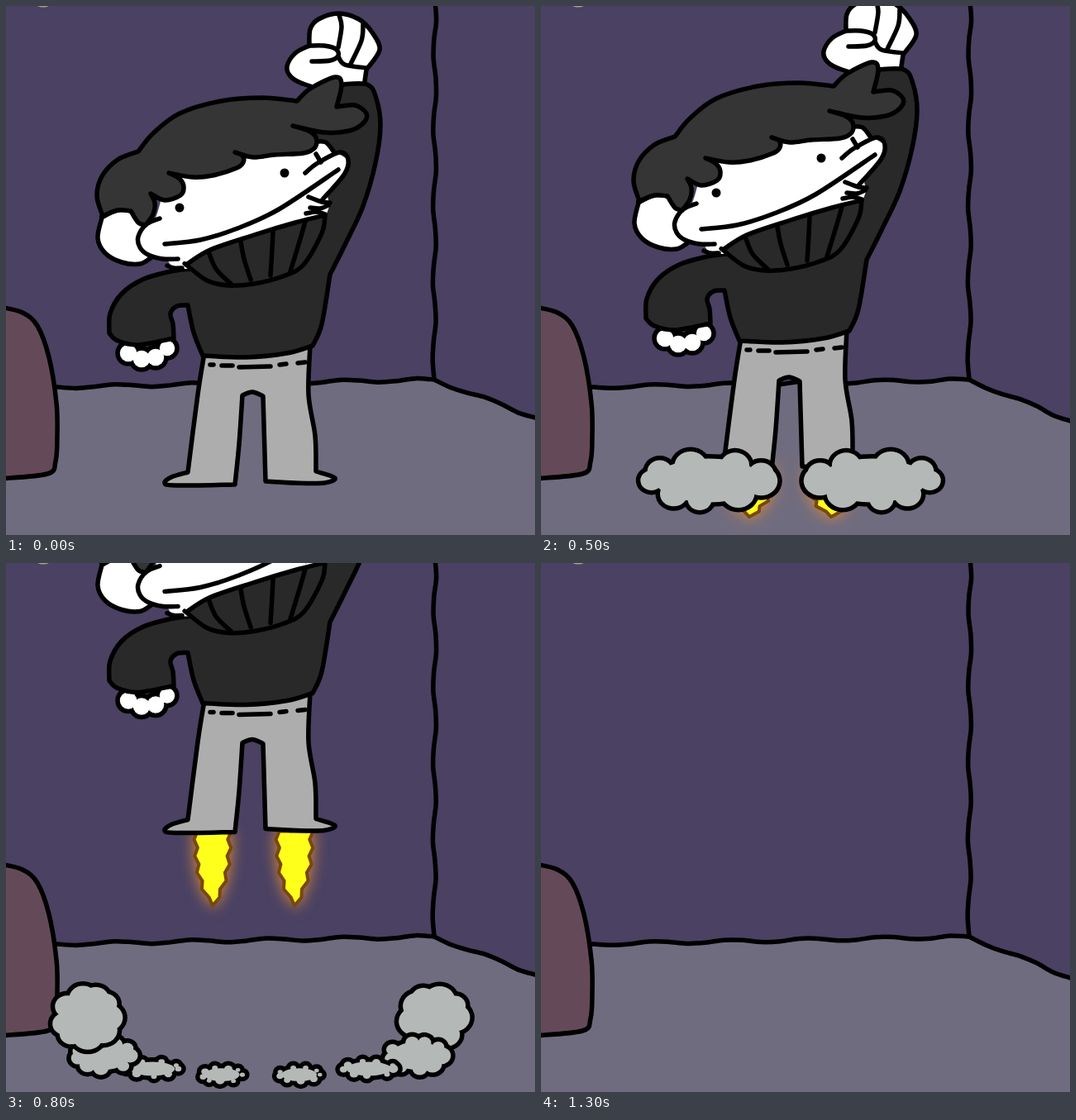
An HTML page that plays this animation: 640x640 px, repeating every 1.4 s.

```html
<!DOCTYPE html>
<html lang="en">
<head>
<meta charset="utf-8">
<title>Rocket shoes</title>
<style>
  html, body { margin: 0; width: 100%; height: 100%; overflow: hidden; background: #4a4163; }
  svg { display: block; width: 100vw; height: 100vh; }
  path { stroke: #000; stroke-width: 5.5; stroke-linecap: round; stroke-linejoin: round; }
  .plain { stroke: none; }
  .flame { stroke: #7a4708; stroke-width: 4; filter: drop-shadow(0 0 9px #d98a3c); }
  .soft { filter: blur(9px); }
</style>
</head>
<body>
<svg id="stage" viewBox="0 0 640 640" preserveAspectRatio="none"></svg>
<script>
const STEP = 100, COUNT = 14, INK = 5.5;
const SKIN = '#fff', HAIR = '#353535', KNIT = '#292929', CLOTH = '#adadad';
const SMOKE = '#b4b8b6', SPARK = '#b99124', FIRE = '#ffff1c';
const { PI, sin, cos, abs, hypot } = Math;
const stage = document.getElementById('stage');

function add(parent, tag, attrs = {}) {
  const node = document.createElementNS('http://www.w3.org/2000/svg', tag);
  for (const key in attrs) node.setAttribute(key, attrs[key]);
  return parent.appendChild(node);
}

const group = (parent, attrs) => add(parent, 'g', attrs);
const range = n => [...Array(n).keys()];

function random(seed) {
  return () => {
    seed = (seed * 16807) % 2147483647;
    return seed / 2147483647;
  };
}

const pairs = text => {
  const n = text.trim().split(/\s+/).map(Number);
  return range(n.length / 2).map(i => [n[2 * i], n[2 * i + 1]]);
};

// Smooth curve through points; "/" marks a corner at the point before it.
function curve(text, closed) {
  const parts = text.split('/').map(pairs);
  const first = parts[0][0];
  if (closed) parts[parts.length - 1].push(first);
  let d = 'M' + first, last = null;
  for (const part of parts) {
    const p = last ? [last, ...part] : part;
    for (let i = 0; i < p.length - 1; i++) {
      const b = p[i], c = p[i + 1], a = p[i - 1] || b, e = p[i + 2] || c;
      const c1 = [0, 1].map(k => b[k] + (c[k] - a[k]) / 6);
      const c2 = [0, 1].map(k => c[k] - (e[k] - b[k]) / 6);
      d += `C${c1} ${c2} ${c}`;
    }
    last = p[p.length - 1];
  }
  return d + (closed ? 'Z' : '');
}

const shape = (parent, fill, text, cls = '') =>
  add(parent, 'path', { d: curve(text, true), fill, class: cls });
const line = (parent, text) => add(parent, 'path', { d: curve(text), fill: 'none' });
const polygon = (parent, fill, points, cls = '') =>
  add(parent, 'path', { d: 'M' + points.join('L') + 'Z', fill, class: cls });

// Hand-drawn straight line as curve text.
function wobble(x0, y0, x1, y1, phase) {
  const dx = x1 - x0, dy = y1 - y0, len = hypot(dx, dy), n = Math.ceil(len / 23);
  return range(n + 1).map(k => {
    const off = k && k < n ? 2 * cos(2 * PI * (k / n * len - phase) / 92) / len : 0;
    return `${x0 + dx * k / n - dy * off} ${y0 + dy * k / n + dx * off}`;
  }).join(' ');
}

// Union of ellipses [x, y, rx, ry] with one common outline.
function blob(parent, fill, lobes) {
  for (const [color, grow] of [['#000', INK / 2], [fill, -INK / 2]])
    for (const [cx, cy, rx, ry = rx] of lobes)
      add(parent, 'ellipse', { cx, cy, rx: rx + grow, ry: ry + grow, fill: color });
}

function puff(parent, x, y, rx, ry, seed, side = 1) {
  const rnd = random(seed), lobes = [[x, y, rx * .8, ry * .75]];
  for (const k of range(9)) {
    const a = (k + .5 * rnd()) * 2 * PI / 9, r = ry * (.34 + .2 * rnd());
    lobes.push([x + side * (rx - r) * cos(a), y + (ry - r) * sin(a), r * 1.1, r]);
  }
  blob(parent, SMOKE, lobes);
}

function star(parent, x, y, rx, ry, side) {
  const rnd = random(77), n = 9;
  polygon(parent, SPARK, range(2 * n).map(k => {
    const a = k * PI / n, r = k === 0 ? 1.05 : k % 2 ? .46 : .7 + .35 * rnd();
    return [x + side * rx * r * cos(a), y + ry * r * sin(a)];
  }));
}

function flame(parent, x, y, width, length) {
  const edge = side => range(9).map(k => {
    const u = k / 9, jag = (k + (side > 0)) % 2 ? 3 : -2;
    return [x + side * width * (1 - u ** 3 + jag / 24), y + length * u];
  });
  polygon(parent, FIRE, [...edge(-1), [x, y + length], ...edge(1).reverse()], 'flame');
}

function room(endY, phase) {
  const g = group(stage);
  const back = wobble(62, 461, 518, 452, phase);
  const side = wobble(518, 452, 640, endY, phase);
  shape(g, '#706c7f', `${back} / ${side} / 640 640 / 0 640 / 0 461`, 'plain');
  line(g, back);
  line(g, side);
  line(g, wobble(519, -5, 518, 451, 60));
  shape(g, '#644a59', '-8 364 20 371 38 387 52 425 61 480 62 520 60 551 50 566 -8 572 / -20 468');
  return g;
}

add(stage, 'rect', { width: 640, height: 640, fill: '#4a4163' });
add(stage, 'ellipse', { cx: 45, cy: -3, rx: 9, ry: 4.5, fill: '#aaa58f' });
const rooms = [room(498, 26), room(502, 30)];
const man = group(stage);
const fires = group(man);

// Trousers, fist and hand
shape(man, CLOTH, '240 420 232 470 220 564 / 200 570 192 577 205 580 277 579 / 282 530 286 471 / 298 467 311 472 / 314 575 / 350 577 385 577 398 571 375 563 / 374 520 366 470 368 410 / 300 405');
add(man, 'path', { d: 'M247 434h4M261 435h13M282 437l38-1M331 434l8-1M353 432l9-1' });
shape(man, SKIN, '367 48 368 28 378 16 402 9 427 16 443 32 452 53 436 77 / 433 98 / 400 104 362 95 345 86 340 73 350 57 367 48');
line(man, '367 48 385 48 399 52 402 60 392 66 370 67');
line(man, '403 11 406 25 402 50');
line(man, '432 22 430 42 416 72');
line(man, '402 61 410 71 437 75');
blob(man, SKIN, [[148, 420, 13], [164, 427, 13], [181, 425, 13], [195, 414, 12]]);

// Sweater, ear and face
shape(man, KNIT, '222 318 195 322 165 331 140 348 126 372 125 396 / 135 405 160 410 203 402 / 202 385 199 372 207 363 220 362 / 227 395 238 423 / 290 425 340 420 371 411 / 382 385 392 325 / 411 287 432 242 447 190 453 145 448 112 437 95 405 95 / 360 150 / 300 300');
shape(man, SKIN, '116 256 132 248 150 248 175 265 / 175 305 / 162 312 140 310 120 299 111 281 116 256');
shape(man, SKIN, '190 225 180 258 165 270 160 284 166 298 196 308 / 203 317 220 318 / 300 295 386 257 / 392 240 / 390 226 408 207 414 188 400 177 390 166 374 160 / 330 150 / 250 170', 'plain');
line(man, '186 257 170 264 160 279 162 292 172 301 190 306 208 306');
line(man, '195 314 203 317 213 317');
line(man, '192 288 235 283 280 269 330 246 402 198');
line(man, '362 202 377 190 404 177 414 186 409 204 383 234');
line(man, '366 231 382 237 392 238');
line(man, '368 244 380 245 390 241');
line(man, '363 251 376 249 386 252');
line(man, '375 164 387 165 397 177');
line(man, '375 179 381 189');
for (const [cx, cy] of [[210, 244], [337, 202]]) add(man, 'circle', { cx, cy, r: 5.5 });

// Hair and ribbed collar
shape(man, HAIR, '117 254 110 230 116 206 135 186 160 176 / 178 154 210 130 260 115 310 111 352 115 / 368 100 398 86 406 95 400 122 / 422 120 436 130 432 142 415 151 385 153 347 145 / 366 151 375 159 374 171 360 178 325 180 299 183 277 177 / 286 181 287 189 279 196 250 205 225 207 197 202 / 210 209 215 219 211 229 192 235 175 227 / 180 238 178 252 169 265 / 160 262 151 248 / 135 247 117 254');
shape(man, KNIT, '218 313 247 295 300 277 350 262 386 253 / 382 275 360 313 335 327 300 336 268 338 243 332 218 313');
for (const k of range(4)) {
  const x = 245 + 39 * k, y = 297 - 12 * k;
  line(man, `${x} ${y} ${x + 9 - 5 * k} ${y + 21} ${x + 27 - 15 * k} ${y + 39 + 7 * k}`);
}

// Fire under the shoes, moving with the body
function drawFire(g, i) {
  if (i === 4) {
    add(g, 'ellipse', { cx: 298, cy: 592, rx: 22, ry: 14, fill: '#d0843c', opacity: .7, class: 'soft' });
    for (const cx of [270, 309]) add(g, 'ellipse', { cx, cy: 586, rx: 14, ry: 7, fill: '#6b3d10' });
  }
  if (i > 4) for (const x of [250, 349])
    flame(g, x, 578, i < 7 ? 28 : 20, i === 5 ? 58 : 90);
}

// Sparks and smoke on the floor
function drawFloor(g, i) {
  const sides = [-1, 1];
  if (i === 2) for (const s of sides) star(g, 297 + 83 * s, 581 - 4 * s, 76, 34, s);
  if (i > 2 && i < 7) {
    const grow = i - 4;
    for (const s of sides) puff(g, 299 + 3 * grow + 99 * s, 575 - grow, 79 + 5 * grow, 37 + 2 * grow, 42 + i, s);
  }
  if (i === 7) blob(g, SMOKE, sides.flatMap(s => range(12).map(k => {
    const u = k / 11;
    return [310 + s * 178 * u, 580 - 22 * u * u + (k % 2 ? -19 : 19) * u, 13 + 12 * u, 9 + 14 * u];
  })));
  if (i > 7 && i < 12) {
    const size = 1.3 - .3 * (i - 8);
    for (const k of range(8)) {
      const a = k * PI / 7, c = abs(cos(a));
      puff(g, 308 + 210 * cos(a), 550 + 70 * abs(sin(a)) ** .5,
        (20 + 14 * c) * size, (11 + 21 * c ** 8) * size, 5 + k);
    }
  }
}

const frames = range(COUNT).map(i => {
  const layers = [group(fires), group(stage)];
  drawFire(layers[0], i);
  drawFloor(layers[1], i);
  return layers;
});

// Rattle on the ground, accelerate, then climb steadily.
function pose(i) {
  const t = i - 4, shaking = i > 0 && i < 5;
  const swing = cos((i - 2) * PI / 2);
  const rise = t < 0 ? 0 : t < 3 ? 18 * t * t : 162 + 91.5 * (t - 3);
  return shaking ? [4.5 + 2.5 * swing, 5 * swing - rise] : [i % 2 ? 2 : 0, -rise];
}

const show = (node, on) => { node.style.display = on ? '' : 'none'; };

function draw(i) {
  const steady = i % 2 === 0 && i !== 4;
  show(rooms[0], steady);
  show(rooms[1], !steady);
  man.setAttribute('transform', `translate(${pose(i)})`);
  show(man, i < 13);
  frames.forEach((layers, k) => layers.forEach(layer => show(layer, k === i)));
}

const start = performance.now();
function tick() {
  draw(Math.floor((performance.now() - start) / STEP) % COUNT);
  requestAnimationFrame(tick);
}
tick();
</script>
</body>
</html>
```
